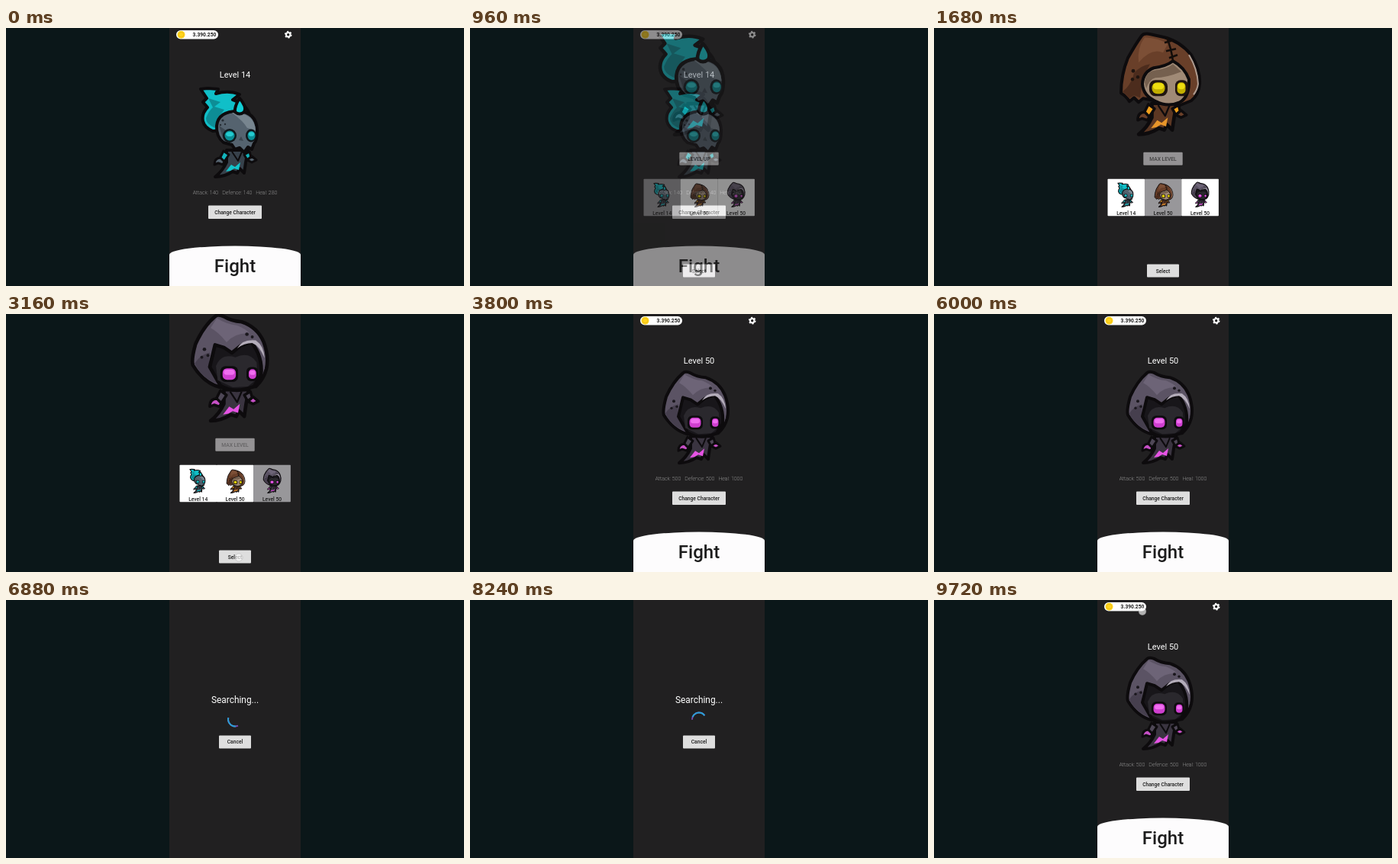
Animation, 600 px wide and 338 px high, one loop 9760 ms. Source, as an HTML page:

```html
<!DOCTYPE html>
<html lang="en">
<head>
<meta charset="utf-8">
<title>Wraith battle app</title>
<style>
html, body { margin: 0; width: 100%; height: 100%; overflow: hidden; background: #0b1719; }
svg { display: block; width: 100vw; height: 100vh; }
text { font: 500 6.7px Roboto, sans-serif; fill: #1c1c1c; text-anchor: middle; white-space: pre; }
.left { text-anchor: start; }
.ink { stroke: #0d0b0d; stroke-width: 4; stroke-linejoin: round; }
.btn { fill: #dedede; }
.bg { fill: #212021; }
</style>
</head>
<body>
<svg viewBox="0 0 600 338" preserveAspectRatio="none">
<defs>
  <g id="body" class="ink">
    <path fill="var(--robe)" d="M289 160L317 160L314 176L312 190L306 184L303 190L297 188Q286 195 274 195Q284 187 289 176Z"/>
    <path fill="var(--glow)" stroke="none" d="M288 188L295 179L300 182L307 176L305 186L299 184L294 187Z"/>
    <path fill="none" stroke-width="2" d="M296 162L304 174L309 162"/>
    <g stroke-width="3">
      <path fill="var(--sleeve)" d="M285 161L292 166L286 175L280 171Z"/>
      <path fill="var(--hand)" d="M281 170Q273 170 273 179L278 177L284 179L286 175Z"/>
      <path fill="var(--sleeve)" d="M312 166L319 162L321 169L316 173Z"/>
      <path fill="var(--hand)" d="M316 173L322 168L328 173L322 176Z"/>
    </g>
  </g>

  <g id="hero1">
    <use class="body" href="#body" style="--robe:#37414b;--glow:#12c4cc;--sleeve:#12b4bc;--hand:#55636f"/>
    <g class="head">
      <path class="ink" fill="#10bfc8" d="M255 80L264 79L278 80L275 86Q292 81 306 87L297 94Q314 99 319 113L285 134L271 135Q260 131 258 122Q256 112 264 104L258 97L263 92Z"/>
      <path fill="#0d8d96" d="M265 92L281 97L273 103L286 107L276 120L274 131Q262 126 262 118Q266 108 271 104Z"/>
      <path class="ink" fill="#55636f" d="M276 128Q278 109 304 109Q328 110 329 134Q329 148 325 151L322 159L317 156L312 163L306 157L300 159L296 153L285 150Q275 142 276 128Z"/>
      <path fill="#77858f" d="M296 111Q325 110 327 134L316 131Q311 122 296 111Z"/>
      <path fill="#3c4751" d="M279 128L285 147L296 151L288 134ZM305 147L308 142L311 148Z"/>
      <path class="ink" stroke-width="3" fill="#12cfd6" d="M306 92Q316 104 312 110Q306 115 300 110Q299 103 306 92Z"/>
      <g fill="#10181c"><circle cx="293" cy="141" r="9"/><ellipse cx="321" cy="141" rx="7" ry="8.5"/></g>
      <g fill="#0b8d94"><circle cx="293" cy="141" r="6.5"/><ellipse cx="321.5" cy="141" rx="5" ry="6"/></g>
      <g fill="#25cbd0"><ellipse cx="293" cy="139" rx="5" ry="3"/><ellipse cx="321.5" cy="139" rx="3.8" ry="2.8"/></g>
      <g fill="#262e35"><circle cx="284" cy="121" r="1.6"/><circle cx="281" cy="127" r="1.2"/><circle cx="287" cy="126" r="1.2"/></g>
    </g>
  </g>

  <g id="hero2">
    <use class="body" href="#body" style="--robe:#5c3723;--glow:#e8952a;--sleeve:#f0a01c;--hand:#6b4029"/>
    <g class="head"><g transform="translate(308 197) scale(.862) translate(-307.5 -142)">
      <path class="ink" fill="#693f29" d="M272 11Q275 7 284 9L302 13Q322 18 337 36Q349 56 348 74Q347 88 337 96L322 102L274 93L268 98L262 92L256 97Q252 90 245 86Q245 62 254 40Q264 22 272 11Z"/>
      <path fill="#7c4f36" d="M276 13Q296 14 306 22L300 33Q285 26 268 46Q266 26 276 13Z"/>
      <path fill="#4c2c1d" d="M247 84Q258 76 262 60Q270 50 283 48Q272 66 270 92L262 89L256 93Z"/>
      <path class="ink" fill="#a08a76" d="M273 74Q274 58 288 53Q304 51 313 44Q328 52 334 68Q335 91 322 98Q306 105 291 97Q274 90 273 74Z"/>
      <path fill="#75604f" d="M276 72Q277 58 290 56Q306 54 313 48L324 58Q304 66 290 66Q282 68 278 80Z"/>
      <path fill="none" stroke="#ad9b90" stroke-width="2" d="M334 36Q345 54 346 74Q345 82 340 88"/>
      <path fill="none" stroke="#130d0a" stroke-width="2.5" d="M305 13Q311 28 313 44M302 20L313 17M304 31L317 28M308 40L319 36"/>
      <g fill="#201510"><circle cx="261" cy="57" r="2.4"/><circle cx="267" cy="65" r="2.2"/><circle cx="260" cy="68" r="2.2"/>
        <rect x="282" y="69" width="24" height="21" rx="8"/><rect x="316" y="69" width="17" height="21" rx="7"/></g>
      <g fill="#c2ae00"><rect x="285.500" y="72" width="17" height="15" rx="7"/><rect x="318.500" y="72" width="11" height="15" rx="5"/></g>
      <g fill="#ecdc10"><rect x="287" y="73" width="14" height="8" rx="4"/><rect x="319.500" y="73" width="9" height="8" rx="4"/></g>
    </g></g>
  </g>

  <g id="hero3">
    <use class="body" href="#body" style="--robe:#3a3440;--glow:#e653e4;--sleeve:#4f4857;--hand:#c750c6"/>
    <g class="head">
      <path class="ink" fill="#5b5364" d="M279 77Q282 74 289 77Q297 82 309 83Q327 89 334 106Q340 122 337 136Q334 148 325 156L285 157Q266 152 254 132Q252 126 257 108Q266 88 279 77Z"/>
      <path fill="#6d6477" d="M281 79Q292 86 304 87Q314 91 318 96Q302 95 292 106Q282 94 274 90Z"/>
      <path fill="#463f4e" d="M256 130Q262 120 273 118L272 134L285 154Q264 148 256 130Z"/>
      <path class="ink" stroke-width="3" fill="#18161a" d="M273 134L279 109L289 112L298 118L308 110L320 106Q333 122 331 143L323 156Q301 165 285 155Z"/>
      <path fill="#2a282d" d="M280 133Q286 118 302 123Q318 116 326 129L327 147L316 156L299 157L282 149Z"/>
      <path fill="#b4adba" d="M304 113Q310 102 325 104Q334 110 335 124Q329 110 321 107Q312 107 304 113Z"/>
      <g fill="#1a171d"><circle cx="267" cy="114" r="2"/><circle cx="271" cy="121" r="1.7"/><circle cx="264" cy="123" r="1.7"/><circle cx="315" cy="97" r="2"/><circle cx="321" cy="100" r="1.700"/></g>
      <g fill="#0d0b0e"><rect x="285" y="133" width="20" height="18" rx="6"/><rect x="314.500" y="134" width="13" height="16" rx="5"/></g>
      <g fill="#cf3fd0"><rect x="287.500" y="135.500" width="15" height="13" rx="5"/><rect x="317" y="136.500" width="8.500" height="11" rx="4"/></g>
      <g fill="#f06df0"><rect x="289" y="137" width="12" height="6" rx="3"/><rect x="318" y="138" width="6.500" height="5" rx="2.500"/></g>
    </g>
  </g>
</defs>

<rect class="bg" x="214" width="172" height="338"/>
<g id="home">
  <rect x="223" y="3" width="55" height="11.500" rx="5.700" fill="#fff"/>
  <circle cx="229.500" cy="8.700" r="5" fill="#ffd51e"/>
  <circle cx="229.500" cy="8.700" r="3.300" fill="none" stroke="#f4bd16"/>
  <text x="260" y="11.200" style="font-weight:700">3.390.250</text>
  <g fill="none" stroke="#fff">
    <circle cx="369.700" cy="8.700" r="2.700" stroke-width="2"/>
    <circle cx="369.700" cy="8.700" r="4.100" stroke-width="1.500" stroke-dasharray="2.147"/>
  </g>
  <text id="level" x="300" y="65" style="font-size:11px;font-weight:400;fill:#fff"></text>
  <use id="homeHero"/>
  <text id="stats" x="300" y="218.300" style="font-size:7px;font-weight:100;fill:#fff"></text>
  <rect class="btn" x="265" y="232.500" width="70" height="17.500" rx="1"/>
  <text x="300" y="243.600">Change Character</text>
  <path fill="#fdfcfd" d="M214 338V297A86 11.500 0 0 1 386 297V338Z"/>
  <text x="300" y="320" style="font-size:24px">Fight</text>
</g>

<g id="select">
  <rect class="bg" x="214" width="172" height="338"/>
  <use id="bigHero" transform="translate(307.500 142) scale(1.160) translate(-308 -197)"/>
  <rect id="upgrade" x="274.300" y="162.700" width="51.400" height="17" rx="1"/>
  <text id="upgradeText" x="300" y="173.700"></text>
  <g id="cards"></g>
  <rect class="btn" x="279" y="309.500" width="42" height="17" rx="1"/>
  <text x="300" y="320.500">Select</text>
</g>

<g id="search">
  <rect class="bg" x="214" width="172" height="338"/>
  <text x="300" y="135.200" style="font-size:11.900px;font-weight:400;fill:#fff">Searching...</text>
  <g id="spinner" fill="none" stroke-width="2">
    <circle id="tail" r="9" stroke="#7a4cb0"/>
    <circle id="arc" r="9" stroke="#2a9fd4"/>
  </g>
  <rect class="btn" x="279" y="177.500" width="42" height="17" rx="1"/>
  <text x="300" y="188.300">Cancel</text>
</g>

<g id="dialog">
  <rect x="214" width="172" height="338" opacity=".54"/>
  <rect x="233" y="127.500" width="134" height="83.500" rx="2" fill="#fff"/>
  <text class="left" x="244.500" y="148.600" style="font-size:9.650px">Log out alert</text>
  <text class="left" x="244.500" y="167" style="font-size:7.650px;font-weight:400;fill:#333">Would you like to log out?</text>
  <g style="--c:#258bd0">
    <text x="312.500" y="198.300" style="fill:var(--c)">Cancel</text>
    <text x="347" y="198.300" style="fill:var(--c)">Log Out</text>
  </g>
</g>
<circle id="touch" r="5" fill="#fff" stroke="#777" stroke-opacity=".5" stroke-width=".8"/>
</svg>

<script>
const LOOP = 9760, FADE = 200;
const $ = id => document.getElementById(id);
const levels = [14, 50, 50];
// time, x, y of each tap
const taps = [[740, 300, 242], [1480, 300, 224], [2420, 349, 224], [3080, 305, 319], [4180, 370, 9],
  [4850, 312, 196], [6360, 300, 312], [8460, 300, 186], [9620, 273, 15]];

$('cards').innerHTML = levels.map((level, i) => {
  const x = 227.5 + i * 48.4, mid = x + 24.2;
  return `<rect class="card" x="${x}" y="197.700" width="48.600" height="48.600" rx=".8"/>
    <use href="#hero${i + 1}" transform="translate(${mid} 235) scale(.27) translate(-295 -197)"/>
    <text x="${mid}" y="244.700">Level ${level}</text>`;
}).join('');
const cards = document.querySelectorAll('.card');

const clamp = v => Math.min(1, Math.max(0, v));
const smooth = v => (v = clamp(v)) * v * (3 - 2 * v);
const visibility = (t, from, to) => smooth((t - from) / FADE) * (1 - smooth((t - to) / FADE));
const set = (id, attrs) => { for (const k in attrs) $(id).setAttribute(k, attrs[k]); };

function fadeScreen(id, alpha) {
  $(id).style.display = alpha ? '' : 'none';
  $(id).style.opacity = alpha;
}

function spin(t) {
  const cycle = (t - 8240) / 1333 + .263, turn = Math.floor(cycle), p = cycle - turn;
  const head = smooth(p * 2), end = smooth(p * 2 - 1);
  const start = 178 + (turn + end) * 270 + (cycle - .263) * 200;
  const sweep = Math.max(8, (head - end) * 270), cut = sweep * .15;
  set('spinner', { transform: `translate(300 156.500) rotate(${start})` });
  const dash = deg => `${deg * Math.PI / 20} 100`;
  set('tail', { 'stroke-dasharray': dash(sweep) });
  set('arc', { 'stroke-dasharray': dash(sweep - cut), transform: `rotate(${cut})` });
}

function draw(now) {
  const t = now % LOOP;
  const bob = Math.sin(t / 930 * 2 * Math.PI);
  document.querySelectorAll('.head').forEach(el => el.setAttribute('transform', `translate(0 ${bob * .7})`));
  document.querySelectorAll('.body').forEach(el => el.setAttribute('transform', `translate(0 ${bob * .3})`));

  const changed = t >= 3300;
  set('homeHero', { href: changed ? '#hero3' : '#hero1' });
  $('level').textContent = changed ? 'Level 50' : 'Level 14';
  $('stats').textContent = changed ? 'Attack: 500   Defence: 500   Heal: 1000' : 'Attack: 140   Defence: 140   Heal: 280';

  const pick = t < 1580 ? 0 : t < 2500 ? 1 : 2;
  set('bigHero', { href: '#hero' + (pick + 1) });
  set('upgrade', { fill: pick ? '#949294' : '#dedede' });
  $('upgradeText').textContent = pick ? 'MAX LEVEL' : 'LEVEL UP';
  $('upgradeText').style.opacity = 1 - .6 * smooth((t - 1580) / FADE);
  cards.forEach((card, i) => card.setAttribute('fill', i === pick ? '#98979a' : '#fff'));

  fadeScreen('select', visibility(t, 860, 3300));
  fadeScreen('search', visibility(t, 6500, 8580));
  fadeScreen('dialog', visibility(t, 4300, 4960));
  spin(t);

  const tap = taps.find(([at]) => t >= at && t < at + 140);
  set('touch', tap ? { cx: tap[1], cy: tap[2], opacity: .65 } : { opacity: 0 });
  requestAnimationFrame(() => draw(performance.now()));
}
draw(0);
</script>
</body>
</html>
```
